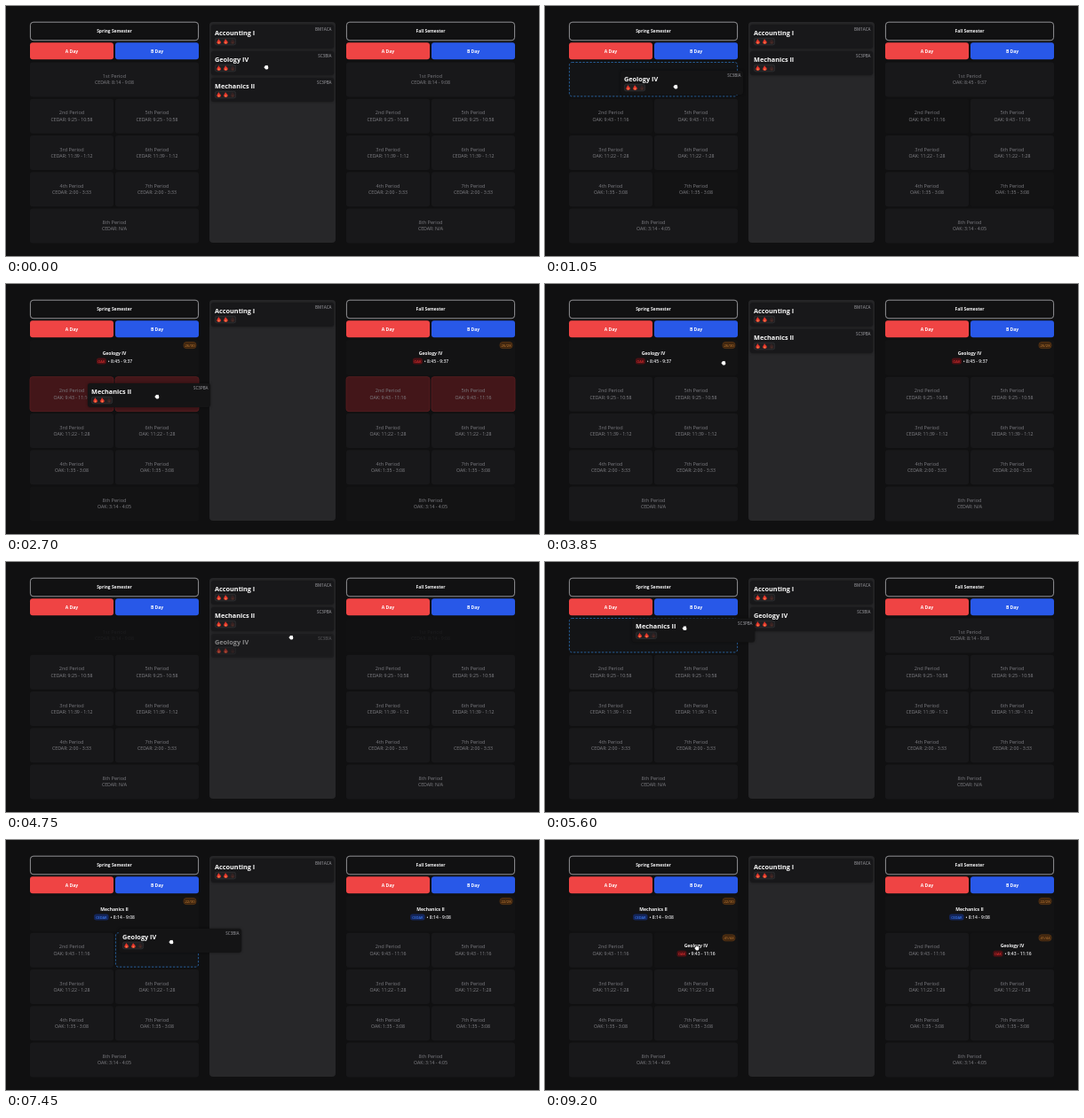
An HTML page with a canvas that plays this animation: 600x282 px, repeating every 9250 ms.

```html
<!DOCTYPE html>
<html lang="en">
<head>
<meta charset="utf-8">
<title>Schedule planner</title>
<style>
  html, body { margin: 0; width: 100%; height: 100%; overflow: hidden; background: #101011; }
  canvas { display: block; width: 600px; height: 282px; }
</style>
</head>
<body>
<canvas id="stage"></canvas>
<script>
const LOOP = 9250;
const canvas = document.getElementById('stage');
const ctx = canvas.getContext('2d');
const scale = window.devicePixelRatio || 1;
canvas.width = 600 * scale;
canvas.height = 282 * scale;

const FONT = '"Open Sans", "Noto Sans", sans-serif';
const COLUMNS = [{ x: 27, name: 'Spring Semester' }, { x: 383, name: 'Fall Semester' }];
const PERIODS = ['1st', '2nd', '3rd', '4th', '5th', '6th', '7th', '8th'];
const TIMES = {
  CEDAR: ['8:14 - 9:08', '9:25 - 10:58', '11:39 - 1:12', '2:00 - 3:33', 'N/A'],
  OAK: ['8:45 - 9:37', '9:43 - 11:16', '11:22 - 1:28', '1:35 - 3:08', '3:14 - 4:05']
};
const TAGS = { OAK: ['#4c1014', '#d92d2d', 11], CEDAR: ['#14265c', '#3b78e8', 16.5] };

// Each phase: start time, mode, list index
const COURSES = {
  accounting: { name: 'Accounting I', code: 'BM1ACA', phases: [[0, 'list', 0]] },
  geology: {
    name: 'Geology IV', code: 'SC3BIA',
    phases: [[0, 'list', 1], [150, 'drag'], [1150, 'dock'], [1350, 'slot'],
             [4600, 'list', 2], [5350, 'list', 1], [6750, 'drag'], [7850, 'slot']]
  },
  mechanics: {
    name: 'Mechanics II', code: 'SC3PBA',
    phases: [[0, 'list', 2], [250, 'list', 1], [2000, 'drag'], [3000, 'list', 1],
             [5250, 'drag'], [5980, 'dock'], [6500, 'slot']]
  }
};
const PLACED = [
  { course: 'geology', slot: 0, school: 'OAK', from: 1350, to: 3920, seats: ['26/30', '26/28'] },
  { course: 'mechanics', slot: 0, school: 'CEDAR', from: 6500, to: LOOP, seats: ['22/30', '22/28'] },
  { course: 'geology', slot: 4, school: 'OAK', from: 7850, to: LOOP, seats: ['41/44', '41/44'] }
];
const HOVERS = [[850, 1350, 0], [3920, 4250, 0], [5600, 6500, 0], [7450, 7850, 4]];
const SHADES = [[1000, 1500, [1, 6]], [2400, 3100, [7]], [6100, 6700, [7]]];
const POINTER = [
  [0, 293, 69], [150, 293, 69], [1000, 147, 91], [1200, 147, 91], [1850, 309, 66], [2000, 309, 66],
  [2650, 170, 127], [2950, 170, 127], [3300, 275, 78], [3800, 201, 89], [3920, 201, 89],
  [4650, 321, 85], [4850, 321, 85], [5150, 290, 62], [5250, 290, 62], [5800, 100, 80],
  [5980, 100, 80], [6350, 236, 83], [6600, 290, 66], [6750, 290, 66], [7650, 171, 122], [LOOP, 171, 122]
];

const mix = (a, b, k) => a + (b - a) * k;
const ramp = (t, from, span) => Math.max(0, Math.min(1, (t - from) / span));
const smooth = k => k * k * (3 - 2 * k);
const within = (t, from, to) => t >= from && t < to;

function pointerAt(t) {
  const i = Math.max(1, POINTER.findIndex(p => p[0] >= t));
  const [t0, x0, y0] = POINTER[i - 1], [t1, x1, y1] = POINTER[i];
  const k = smooth(ramp(t, t0, t1 - t0));
  return { x: mix(x0, x1, k), y: mix(y0, y1, k) };
}

function phaseIndex(phases, t) {
  let i = 0;
  while (i + 1 < phases.length && phases[i + 1][0] <= t) i++;
  return i;
}

function cardTarget(phases, i, t) {
  const [start, mode, row] = phases[i];
  if (mode === 'list') return { x: 231, y: 21 + row * 30 };
  if (mode !== 'drag') return { x: 29, y: 66 };
  const home = cardTarget(phases, i - 1, start);
  const grab = pointerAt(start), now = pointerAt(t);
  return { x: home.x + now.x - grab.x, y: home.y + now.y - grab.y };
}

function cardPosition(phases, i, t) {
  const pos = cardTarget(phases, i, t);
  if (i === 0 || phases[i][1] === 'drag' || phases[i - 1][1] === 'slot') return pos;
  const start = phases[i][0], old = cardTarget(phases, i - 1, start);
  const k = smooth(ramp(t, start, 200));
  return { x: mix(old.x, pos.x, k), y: mix(old.y, pos.y, k) };
}

function box(x, y, w, h, r, fill, stroke, dash = []) {
  ctx.beginPath();
  ctx.roundRect(x, y, w, h, r);
  if (fill) { ctx.fillStyle = fill; ctx.fill(); }
  if (stroke) {
    ctx.strokeStyle = stroke;
    ctx.lineWidth = 0.8;
    ctx.setLineDash(dash);
    ctx.stroke();
    ctx.setLineDash([]);
  }
}

function label(text, x, cy, size, color, weight = 400, align = 'center') {
  ctx.font = `${weight} ${size}px ${FONT}`;
  ctx.textAlign = align;
  ctx.fillStyle = color;
  ctx.fillText(text, x, cy + size * 0.36);
}

function faded(alpha, paint) {
  ctx.save();
  ctx.globalAlpha *= alpha;
  paint();
  ctx.restore();
}

function slotBox(i, left) {
  const row = i === 7 ? 4 : i > 3 ? i - 3 : i;
  const wide = i === 0 || i === 7;
  return { x: left + (i > 3 && !wide ? 96 : 0), y: 63.4 + row * 41.25, w: wide ? 190 : 94, h: 39, row };
}

function drawPlaced(item, b, column) {
  const cx = b.x + b.w / 2, right = b.x + b.w;
  const [bg, fg, tagWidth] = TAGS[item.school];
  const time = '• ' + TIMES[item.school][item.slot ? 1 : 0];
  box(b.x, b.y, b.w, b.h, 3, '#131314');
  label(COURSES[item.course].name, cx, b.y + 15, 5.1, '#f4f4f5', 700);
  ctx.font = `600 5px ${FONT}`;
  const x = cx - (tagWidth + 2 + ctx.measureText(time).width) / 2;
  box(x, b.y + 20.2, tagWidth, 7, 2.5, bg);
  label(item.school, x + tagWidth / 2, b.y + 23.7, 3.9, fg, 600);
  label(time, x + tagWidth + 2, b.y + 23.6, 5, '#e4e4e7', 600, 'left');
  box(right - 17, b.y + 2.2, 14, 7, 3, '#40260f', '#5a3513');
  label(item.seats[column], right - 10, b.y + 5.7, 4.2, '#c98238');
}

function drawSlot(i, column, t, school) {
  const b = slotBox(i, COLUMNS[column].x);
  const hover = column === 0 && HOVERS.some(h => h[2] === i && within(t, h[0], h[1]));
  if (hover) {
    box(b.x + 0.4, b.y + 0.1, b.w - 0.8, b.h - 0.6, 3, '#131416', '#2c70b8', [2.4, 1.6]);
    return;
  }
  const shaded = SHADES.some(s => within(t, s[0], s[1]) && s[2].includes(i));
  const opacity = i === 0 && within(t, 3920, 5100) ? mix(0.12, 1, ramp(t, 4750, 350)) : 1;
  faded(opacity, () => {
    box(b.x, b.y, b.w, b.h, 3, shaded ? '#131314' : '#18181a');
    if (i === 1 || i === 4) {
      const red = ramp(t, 2050, 200) * (1 - ramp(t, 3000, 200));
      if (red > 0) faded(red, () => box(b.x, b.y, b.w, b.h, 3, '#431619', '#5b1d20'));
    }
    const cx = b.x + b.w / 2;
    label(PERIODS[i] + ' Period', cx, b.y + 15.6, 5.6, '#7b7b80');
    label(`${school}: ${TIMES[school][b.row]}`, cx, b.y + 23.2, 5.2, '#85858a');
  });
  const item = PLACED.find(p => p.slot === i && within(t, p.from, p.to));
  if (item) faded(ramp(t, item.from - 50, 150), () => drawPlaced(item, b, column));
}

function drawColumn(column, t) {
  const { x, name } = COLUMNS[column];
  const school = within(t, 600, 3600) || t >= 6600 ? 'OAK' : 'CEDAR';
  box(x + 0.4, 18.2, 189.2, 20.6, 3.5, '#111112', '#b4b4b8');
  label(name, x + 95, 28.6, 4.9, '#f4f4f5', 700);
  box(x, 41.2, 94, 19, 3, '#ef4444');
  box(x + 96, 41.2, 94, 19, 3, '#2858e8');
  label('A Day', x + 47, 50.8, 5, '#fff', 700);
  label('B Day', x + 143, 50.8, 5, '#fff', 700);
  PERIODS.forEach((_, i) => drawSlot(i, column, t, school));
}

function drawFlame(x, y) {
  ctx.beginPath();
  ctx.moveTo(x - 0.4, y - 3);
  ctx.bezierCurveTo(x + 0.4, y - 1.2, x + 2.6, y - 0.6, x + 2.3, y + 1.4);
  ctx.bezierCurveTo(x + 2, y + 3.2, x - 2, y + 3.2, x - 2.3, y + 1.4);
  ctx.bezierCurveTo(x - 2.5, y, x - 1, y - 0.6, x - 0.4, y - 3);
  ctx.fillStyle = '#e5352b';
  ctx.fill();
  ctx.beginPath();
  ctx.ellipse(x, y + 1.5, 0.9, 1, 0, 0, 7);
  ctx.fillStyle = '#f58a4b';
  ctx.fill();
}

function drawCard(course, pos, lifted) {
  const { x, y } = pos;
  ctx.save();
  ctx.shadowColor = 'rgba(0,0,0,.5)';
  ctx.shadowBlur = 3 * scale;
  box(x, y, 138, 27, 3, lifted ? '#141415' : '#18181a');
  ctx.restore();
  label(course.name, x + 4, y + 9.2, 7.3, '#fafafa', 700, 'left');
  label(course.code, x + 135.5, y + 5.3, 4.5, '#85858a', 600, 'right');
  box(x + 4.4, y + 15.3, 23.2, 7.6, 2, '#202022', '#303033');
  [0, 1, 2].forEach(n => faded(n < 2 ? 1 : 0.12, () => drawFlame(x + 8.6 + n * 7.8, y + 19.1)));
}

function drawCards(t) {
  const lifted = [];
  for (const course of Object.values(COURSES)) {
    const i = phaseIndex(course.phases, t);
    const [start, mode] = course.phases[i];
    if (mode === 'slot') continue;
    const pos = cardPosition(course.phases, i, t);
    const fromSlot = i > 0 && course.phases[i - 1][1] === 'slot';
    const paint = () => faded(fromSlot ? ramp(t, start, 300) : 1, () => drawCard(course, pos, mode !== 'list'));
    if (mode === 'list') paint(); else lifted.push(paint);
  }
  lifted.forEach(paint => paint());
  // The placed course is pulled back out at slot size
  if (within(t, 3920, 4600)) {
    const grab = pointerAt(3920), now = pointerAt(t), b = slotBox(0, 27);
    b.x += now.x - grab.x;
    b.y += now.y - grab.y;
    faded(1 - ramp(t, 4450, 150), () => drawPlaced(PLACED[0], b, 0));
  }
}

function drawPointer(t) {
  const { x, y } = pointerAt(t);
  ctx.save();
  ctx.translate(x, y);
  ctx.beginPath();
  if (within(t, 6200, 6550)) {
    [[-0.6, -2.8], [-0.6, 2], [0.5, 1.1], [1.3, 2.7], [2, 2.3], [1.3, 0.8], [2.6, 0.7]]
      .forEach(([px, py]) => ctx.lineTo(px, py));
    ctx.closePath();
  } else {
    ctx.roundRect(-1.7, -1.2, 4, 3.6, 1.3);
    [-1.4, -0.3, 0.8].forEach(px => ctx.roundRect(px, -2.3, 1, 2.4, 0.5));
    ctx.roundRect(-2.5, -0.7, 1.6, 1.6, 0.7);
  }
  ctx.strokeStyle = '#09090b';
  ctx.lineWidth = 0.9;
  ctx.stroke();
  ctx.fillStyle = '#fff';
  ctx.fill();
  ctx.restore();
}

function draw(t) {
  ctx.setTransform(scale, 0, 0, scale, 0, 0);
  ctx.fillStyle = '#101011';
  ctx.fillRect(0, 0, 600, 282);
  COLUMNS.forEach((_, column) => drawColumn(column, t));
  box(229, 18, 142, 249, 4, '#272729');
  drawCards(t);
  drawPointer(t);
}

let began;
function tick(now) {
  began ??= now;
  draw((now - began) % LOOP);
  requestAnimationFrame(tick);
}
draw(0);
requestAnimationFrame(tick);
</script>
</body>
</html>
```
